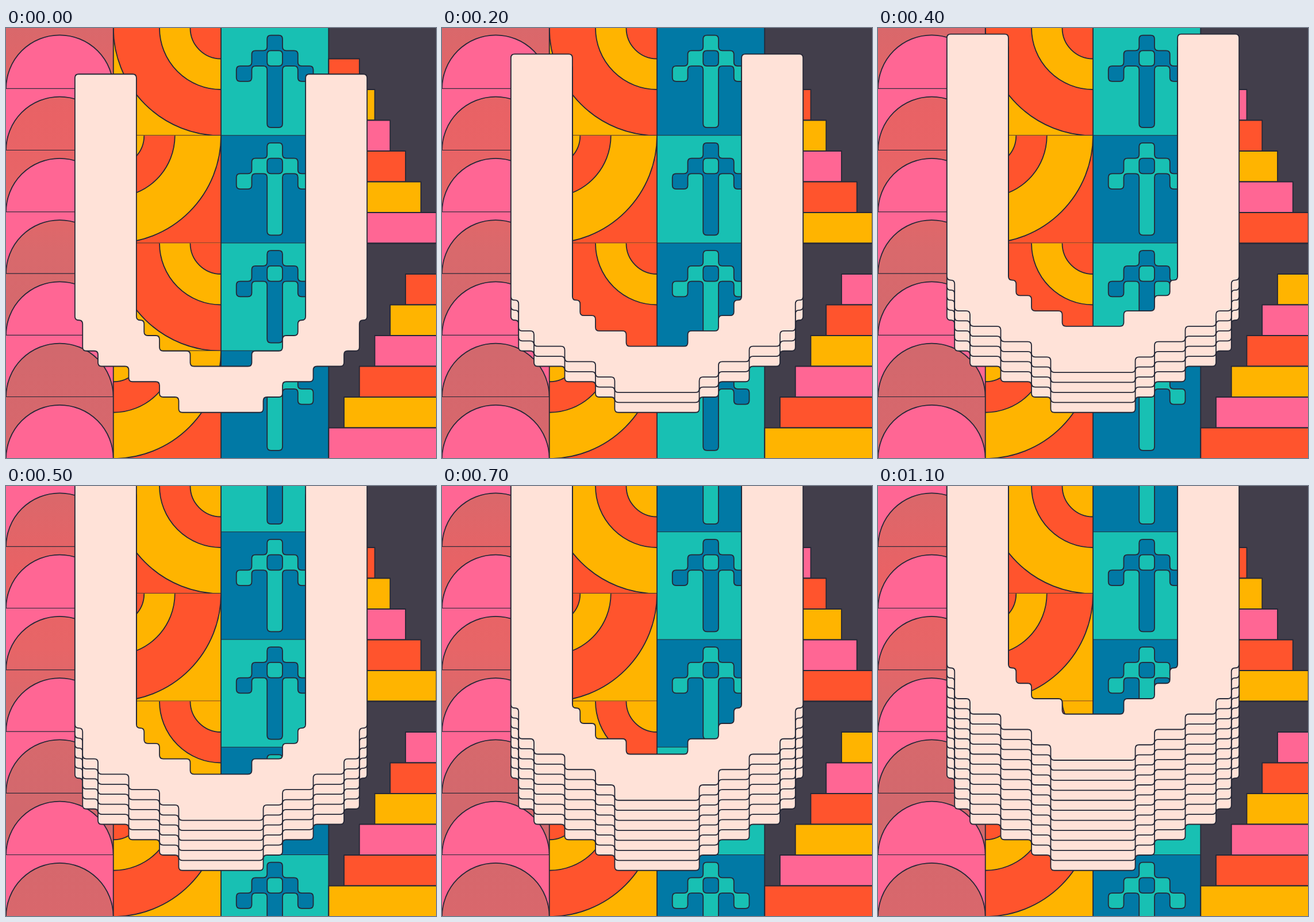
These frames come from a looping animation (748 by 748 pixels, 1200 ms). An HTML page:

```html
<!DOCTYPE html>
<html lang="en">
<head>
<meta charset="utf-8">
<title>Stacking U</title>
<style>
  html, body { margin: 0; width: 100%; height: 100%; overflow: hidden; background: #423e4b; }
  #stage { display: block; width: 100%; height: 100%; }
  .ink { stroke: #262837; stroke-width: 1.8; stroke-linejoin: round; }
</style>
</head>
<body>
<svg id="stage" viewBox="0 0 748 748">
  <defs>
    <linearGradient id="coral" gradientUnits="userSpaceOnUse" x1="0" y1="0" x2="0" y2="748">
      <stop offset="0" stop-color="#d9686b"/>
      <stop offset=".2" stop-color="#e96265"/>
      <stop offset=".38" stop-color="#e76567"/>
      <stop offset=".52" stop-color="#d9696c"/>
      <stop offset=".75" stop-color="#d2686d"/>
      <stop offset="1" stop-color="#d9676c"/>
    </linearGradient>
  </defs>
  <g id="scene"></g>
</svg>
<script>
const SIZE = 748, UNIT = 26.75, TILE = 7 * UNIT, MID = 374;
const STEP_MS = 100, STEPS = 12, LIFT = 17.43, CORNER = 6.5;
const PINK = '#ff6694', CORAL = 'url(#coral)', ORANGE = '#ff542d', YELLOW = '#ffb400';
const TEAL = '#18c0b3', BLUE = '#0179a5', DARK = '#423e4b', CREAM = '#ffe2d8';
const scene = document.getElementById('scene');

const columnX = i => MID + (i - 2) * TILE;
const repeat = (count, draw) => Array.from({ length: count }, (_, i) => draw(i)).join('');
const swapIf = (flag, a, b) => flag ? [b, a] : [a, b];

const rect = (x, y, w, h, fill, cls = '') =>
  `<rect class="${cls}" x="${x}" y="${y}" width="${w}" height="${h}" fill="${fill}"/>`;
const circle = (x, y, r, fill) =>
  `<circle class="ink" cx="${x}" cy="${y}" r="${r}" fill="${fill}"/>`;
const line = (x1, y1, x2, y2) =>
  `<path class="ink" d="M${x1} ${y1}L${x2} ${y2}"/>`;
const shape = (d, fill) => `<path class="ink" d="${d}" fill="${fill}"/>`;

// Nested viewport that clips its content but keeps stage coordinates.
const clipped = (x, y, w, h, content) =>
  `<svg x="${x}" y="${y}" width="${w}" height="${h}" viewBox="${x} ${y} ${w} ${h}">${content}</svg>`;

const mirror = half => [...half, ...half.map(([x, y]) => [-x, y]).reverse()];

function roundedPath(cells, ox, oy) {
  const points = cells.map(([x, y]) => [ox + x * UNIT, oy + y * UNIT]);
  const toward = ([x, y], [tx, ty]) => {
    const k = CORNER / Math.hypot(tx - x, ty - y);
    return `${x + (tx - x) * k} ${y + (ty - y) * k}`;
  };
  return points.map((p, i) => {
    const before = points.at(i - 1), after = points[(i + 1) % points.length];
    return `${i ? 'L' : 'M'}${toward(p, before)}Q${p[0]} ${p[1]} ${toward(p, after)}`;
  }).join('') + 'Z';
}

const LETTER = mirror([
  [2, 22], [2, 21], [4, 21], [4, 20], [5, 20], [5, 19], [5.5, 19], [5.5, 3], [9.5, 3], [9.5, 19],
  [9, 19], [9, 21], [8, 21], [8, 22], [6, 22], [6, 23], [4, 23], [4, 24], [2.75, 24], [2.75, 25]
]);
const ARROW = mirror([
  [.5, 0], [.5, 1], [1.5, 1], [1.5, 2], [2.5, 2], [2.5, 3], [1.5, 3], [1.5, 2], [.5, 2], [.5, 6]
]);
const HOLE = mirror([[.5, 1], [.5, 2]]);

function arches(step) {
  const pitch = 107.25, width = columnX(1);
  return repeat(7, i => {
    const base = 105.7 + i * pitch, top = base - pitch;
    const [back, front] = swapIf((i + step) % 2, CORAL, PINK);
    return clipped(0, top, width, pitch,
      rect(0, top, width, pitch, back) + circle(width / 2, base, width / 2, front)) +
      line(0, base, width, base);
  });
}

function rings(step) {
  const x = columnX(1);
  return repeat(4, i => {
    const y = i * TILE, cx = i % 2 ? x : x + TILE;
    const [a, b] = swapIf((i + step) % 2, YELLOW, ORANGE);
    return clipped(x, y, TILE, TILE,
      rect(x, y, TILE, TILE, a) +
      circle(cx, y, TILE, b) + circle(cx, y, 4 * UNIT, a) + circle(cx, y, 2 * UNIT, b)) +
      line(x, y + TILE, x + TILE, y + TILE);
  });
}

// The column climbs four cells, then three, so two steps make one tile.
function arrows(step) {
  const x = columnX(2), axis = x + TILE / 2;
  const scroll = Math.floor(step / 2) * 7 + (step % 2) * 4;
  const first = Math.floor(scroll / 7);
  return repeat(5, i => {
    const tile = first + i, y = (tile * 7 - scroll) * UNIT, top = y + 0.47 * UNIT;
    const [back, front] = swapIf(tile % 2, TEAL, BLUE);
    return rect(x, y, TILE, TILE, back) +
      shape(roundedPath(ARROW, axis, top), front) +
      shape(roundedPath(HOLE, axis, top), back) +
      line(x, y + TILE, x + TILE, y + TILE);
  });
}

function stairs(step) {
  const x = columnX(3), colors = [ORANGE, YELLOW, PINK];
  const flight = (top, span) => repeat(6, i => {
    const [from, to] = span(i);
    return rect(x + from * UNIT, top + 2 * i * UNIT, (to - from) * UNIT, 2 * UNIT,
      colors[(i + step) % 3], 'ink');
  });
  return rect(x, 0, SIZE - x, SIZE, DARK) +
    flight(2 * UNIT, i => [0, i + 2]) +
    flight(16 * UNIT, i => [5 - i, 8]) +
    line(x, 2 * TILE, SIZE, 2 * TILE);
}

const letters = step => repeat(step + 1, i =>
  shape(roundedPath(LETTER, MID, -i * LIFT), CREAM));

const dividers = () => repeat(3, i => line(columnX(i + 1), 0, columnX(i + 1), SIZE));

let shown = -1;
function render(time) {
  const step = Math.floor(time / STEP_MS) % STEPS;
  if (step !== shown) {
    shown = step;
    scene.innerHTML = arches(step) + rings(step) + arrows(step) + stairs(step) +
      dividers() + letters(step);
  }
}

const start = performance.now();
function tick() {
  render(performance.now() - start);
  requestAnimationFrame(tick);
}
tick();
</script>
</body>
</html>
```
